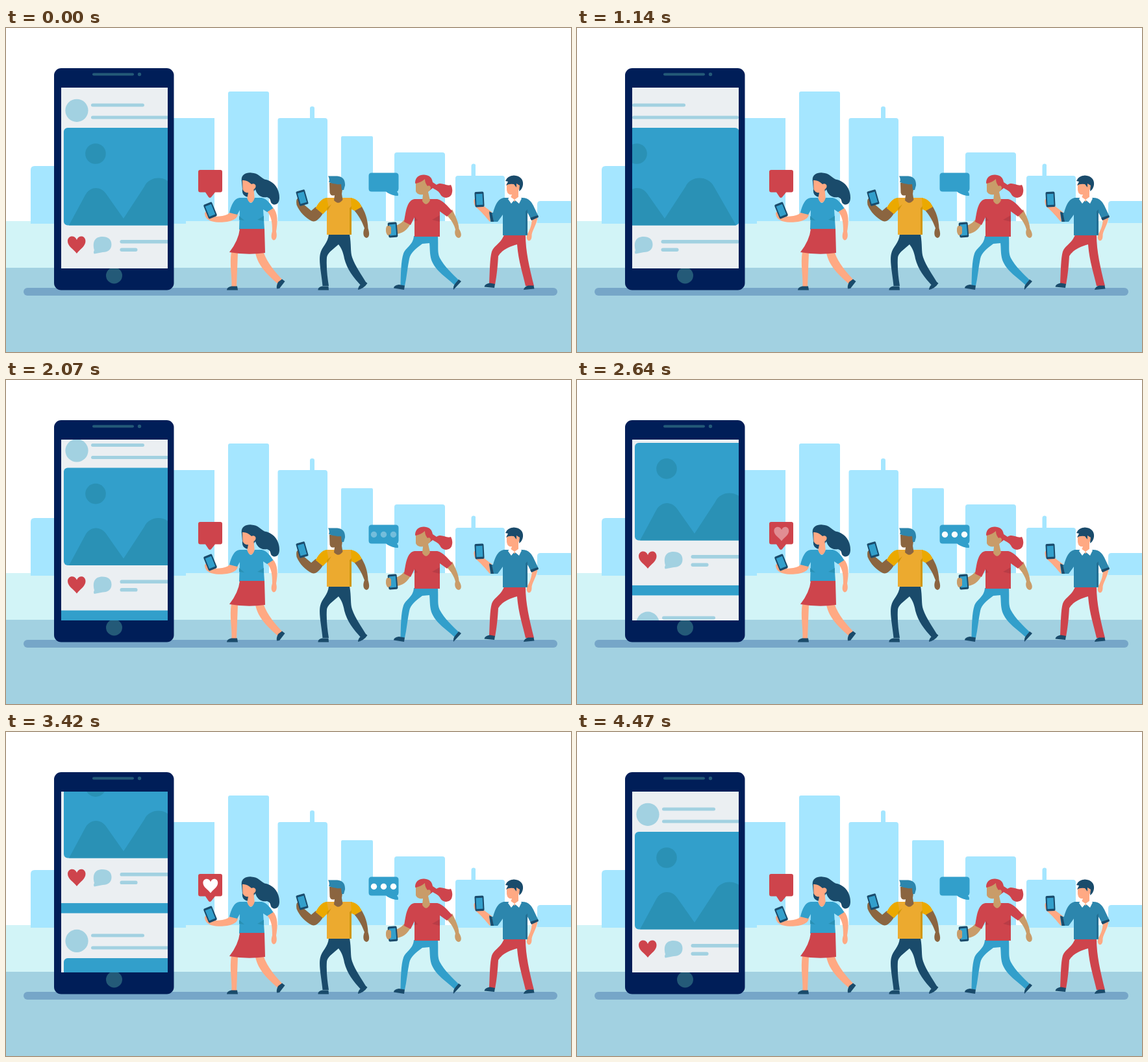
Recreate the animation shown at these times as an HTML page. Size 870 by 500 pixels, loop 4.5 s.

```html
<!DOCTYPE html>
<html lang="en">
<head>
<meta charset="utf-8">
<title>Social feed</title>
<style>
html, body { margin: 0; width: 100%; height: 100%; overflow: hidden; background: #fff; }
svg { display: block; }
.sky { fill: #a5e6ff; } .pale { fill: #a2d1e1; } .blue { fill: #329fcb; } .teal { fill: #2c86ad; }
.navy { fill: #1a4b6b; } .red { fill: #ce444c; } .peach { fill: #ffa983; } .brown { fill: #8b6540; }
.tan { fill: #c99c69; } .gold { fill: #ecaa2f; } .hill { fill: #2a91b5; } .white { fill: #fff; }
</style>
</head>
<body>
<svg width="870" height="500" viewBox="0 0 870 500">
  <defs>
    <path id="heart" d="M109 348C104 341 95 337 95 329C95 320 106 319 109 327C112 319 122.500 320 122.500 329C122.500 337 114 341 109 348Z"/>
    <g id="post">
      <g class="pale">
        <circle cx="109" cy="127.300" r="17.600"/>
        <rect x="131" y="116.500" width="82" height="5" rx="2.500"/>
        <rect x="131" y="135.500" width="164" height="5" rx="2.500"/>
        <path d="M148.500 322C157 322 162.500 326 162.500 334C162.500 342 157 346 149 346L136 348.500Q134 347 136 343C133 331 136 322 148.500 322Z"/>
        <rect x="175.500" y="327" width="120" height="5.500" rx="2.700"/>
        <rect x="175.500" y="339.500" width="27" height="5.500" rx="2.700"/>
      </g>
      <rect class="blue" x="89" y="154" width="206.500" height="150.500" rx="6"/>
      <g class="hill">
        <circle cx="138" cy="194" r="15.800"/>
        <path d="M97 304.500L122 258C130 243 147 244 155 257L181 294L213 245C221 227 248 227 257 245L291 304.500Z"/>
      </g>
      <use href="#heart" class="red"/>
    </g>
    <g id="mobile">
      <rect class="navy" x="-7" y="-11.700" width="14" height="23.400" rx="2"/>
      <rect class="blue" x="-5" y="-8.500" width="10" height="17"/>
    </g>
  </defs>

  <path fill="#d2f4f7" d="M0 298H870V371H0Z"/>
  <g class="sky">
    <path d="M38 302V219Q38 213 44 213H90V302ZM250 139H321V298H277V302H250ZM818 301V272Q818 267 823 267H870V301Z"/>
    <path d="M342 298V101Q342 98 345 98H402Q405 98 405 101V298ZM516 298V169Q516 167 518 167H563Q565 167 565 169V240H585V298Z"/>
    <path d="M418.500 298V142Q418.500 139 422 139H468V124Q468 121 471.500 121T475 124V139H491Q495 139 495 143V298Z"/>
    <path d="M598 298V196Q598 192 602 192H672Q676 192 676 196V298Z"/>
    <path d="M692 302V232Q692 228 696 228H716.500V213Q716.500 209.500 720 209.500T723 213V228H764Q768 228 768 232V302Z"/>
  </g>
  <path class="pale" d="M0 370H870V500H0Z"/>
  <rect x="27" y="401" width="822" height="12" rx="6" fill="#76a6c8"/>

  <rect x="74" y="62" width="184.500" height="342.500" rx="11" fill="#001e58"/>
  <g fill="#245a78">
    <rect x="133" y="69.500" width="64" height="4" rx="2"/>
    <circle cx="205.500" cy="71.500" r="2.700"/>
    <circle cx="166.500" cy="382" r="12.500"/>
  </g>
  <svg x="85" y="92" width="164" height="279" viewBox="85 92 164 279">
    <rect x="85" y="92" width="164" height="279" fill="#ebeff2"/>
    <g id="feed">
      <use href="#post"/>
      <rect class="blue" x="85" y="374" width="230" height="15.500"/>
      <use href="#post" y="305"/>
    </g>
  </svg>

  <path class="red" d="M299 219H330Q333 219 333 222V250Q333 253.500 330 253.500H322L316 261Q314 263 312 261L307 253.500H299Q296 253.500 296 250V222Q296 219 299 219Z"/>
  <use id="like" href="#heart" class="white" transform="translate(315 227)scale(.83)translate(-109 -322)"/>
  <path class="blue" d="M563 223.500H600Q604.500 223.500 604.500 228V248Q604.500 251 602 252.500Q605 256 603.500 259Q594 259 585 252.500H563Q558.500 252.500 558.500 248V228Q558.500 223.500 563 223.500Z"/>
  <g id="dots" class="white">
    <circle cx="566.500" cy="238.500" r="4.700"/><circle cx="581.500" cy="238.500" r="4.700"/><circle cx="596.500" cy="238.500" r="4.700"/>
  </g>

  <g id="woman-in-skirt">
    <path class="navy" d="M363 237C361 227 369 222.500 378 223.500C389 224 391 230 398 233.500C412 236 421 247 421 262C421 270 416 274 411 272C405 269 410 264 402 261C392 263 386 256 384 249L375 261C367 261 363 256 364 249Z"/>
    <path class="peach" d="M364 235Q371 234 378 241Q383 239 384.500 243Q385 247 381.500 249L383 265Q377 274 371 265L373 254Q367 255 364.500 249Z"/>
    <path class="peach" d="M384 347H397C402 362 415 377 426 389L420 396C405 383 388 368 384 347ZM347 345L357 347L355 399H347.500C348 380 344 365 347 345Z"/>
    <path class="navy" d="M340 404.500Q340 400 347 398.500H356L357 404.500ZM417 402.500Q416 398 419 392L425 387.500L429.500 391L421 402Z"/>
    <path class="peach" d="M346 283L357 286C358 297 340 301 323 299.500C312 298 307 294 306 287Q306 283 309 284L315 291C327 291 341 291 346 283ZM402 283L411 277C419 285 418.500 300 416 314C418 322 416 327.500 412 327.500C408 326 408 320 410 314C410 300 409 291 402 283Z"/>
    <use href="#mobile" transform="translate(314.500 281.500)rotate(-22)"/>
    <path class="blue" d="M371 262Q377 278 383 262H394C402 264 407 271 411.500 278L402 284L396 280L398 311H359L360 281L356 288L344 285C347 273 351 263 360 262Z"/>
    <path class="hill" d="M359 290L367 297L359 296ZM397 290V298L387 296Z"/>
    <path class="red" d="M360 310H398L399 347Q372 351 344 346Q358 328 360 310Z"/>
  </g>

  <g id="man-in-cap">
    <path class="brown" d="M477 276L488 286C482 296 476 300 471 298C461 293 452 284 447.500 273Q446 263 450 263L457 271L470 282ZM535 280L546 273C553 283 557 295 557.500 309C560 317 560 323 555 324C550 323 549 316 552 309C548 298 543 289 535 280Z"/>
    <use href="#mobile" transform="translate(456 262)rotate(-16)"/>
    <path class="navy" d="M497 318H529C532 335 530 345 533 354C538 368 547 380 554 392L547 398C535 385 525 372 521 356C519 345 516 339 512 334C503 342 495 347 494 354C493 370 495 385 497 398H487.500C486 380 481 360 484 348C486 338 496 332 497 318ZM480.500 404.500Q480 400 487 398.500H496.500L497 404.500ZM542 404Q542 399 547 395L553 391L556.500 394Q551 402 542 404Z"/>
    <path class="gold" d="M494 262H531C540 264 545 269 547.500 276L537 282L532 280V319H494V280L488 287L477 278C481 270 486 263 494 262Z"/>
    <path fill="#eba900" d="M494 262L497 278L488 287L477 278C481 270 486 263 494 262ZM531 262C540 264 545 269 547.500 276L537 282L532 279Z"/>
    <path fill="#d19608" d="M529 278L532 275V319H529ZM494 278L501 272L495 282Z"/>
    <path class="brown" d="M498 239H516Q520 243 518 249L517 256L518.500 265Q512 274 505 266L506 258Q500 260 498.500 254Z"/>
    <path class="teal" d="M496 228.500H510C519 229 522.500 235 522 243L520 250H517L516 241Q507 242 497 238Q499 233 496 228.500Z"/>
  </g>

  <g id="woman-with-ponytail">
    <path class="blue" d="M628 321H665C666 340 664 346 668 355C675 368 687 379 698 390L692 398C680 386 661 375 655 358C652 348 653 338 652 332L641 333C630 341 623 347 621 356C618 370 617 385 614 398L607.500 397C608 380 608 360 612 348C616 338 627 335 628 321Z"/>
    <path class="navy" d="M597 401.500Q597 397 605 396L614 397.500L613 404ZM689 404Q688 399 692 394L697 388L701 391Z"/>
    <path class="tan" d="M679 289L687 280C692 290 697 300 697.500 310C702 317 702 323 697 324C692 323 690 317 692 311C690 303 686 297 679 289ZM613 296L623 302C618 312 610 317 601 318L588 320C584 316 584 308 588 305C596 307 606 305 613 296Z"/>
    <use href="#mobile" transform="translate(595.500 311.500)rotate(-5)"/>
    <path class="tan" d="M586 306Q592 304 593 308V317Q590 321 587 319Q584 312 586 306Z"/>
    <path class="red" d="M629 264H664C673 266 680 275 687.500 283L679 291L668 283V322H629V292L623 304L613 299C616 280 618 266 629 264Z"/>
    <path fill="#b93c46" d="M668 289V299L656 296ZM629 291L634 297L629 298Z"/>
    <path class="red" d="M630 239C630 230 637 226 644 226.500C653 227 656 232 657 238L663 242C670 236 678 245 685 242Q689 249 686 257C682 264 672 263 669 257C666 251 662 250 657 247L652 251L633 244Z"/>
    <path class="tan" d="M631 240Q640 238 645 233Q645 239 649 244Q653 242 654 246Q654 250 650 253L653 266Q647 277 641 267L642 257Q633 258 631 252Z"/>
  </g>

  <g id="man-in-sweater">
    <path class="peach" d="M754 294L745 299C738 291 732 283 723 276Q719 270 721 264L726 265L736 275L748 284ZM810 292L818.500 293C817 303 811 311 809.500 319C810 326 807 329.500 804 328C801 326 801 320 804 316C808 308 810 301 810 292Z"/>
    <use href="#mobile" transform="translate(729 264.500)rotate(-3)"/>
    <path class="red" d="M767 319H800C800 345 806 370 813 398H800C796 380 789 360 787 334C775 337 763 343 758 352C757 368 756 380 753 396L744 395C745 375 745 355 748 345C752 335 762 333 767 319Z"/>
    <path class="navy" d="M736.500 399.500Q737 395 745 393.500L753 395L752 401ZM797 404Q798 399 804 397.500H812.500L813.500 402.500Z"/>
    <path class="teal" d="M774 262H793C804 261 809 268 812 274L820 291L809 296L803 285V320H765V288L757 299L746 299L744 285L750 285C753 273 758 262 768 262Z"/>
    <path class="navy" d="M744 283L748 285L751 299L747 299ZM807 293L819 289L820 292L809 297Z"/>
    <path fill="#236f94" d="M800 283L803 280V318L800 319Z"/>
    <path class="peach" d="M771 240H788Q793 242 792 246Q791 249 789 250V262L783 268L777 262L779 257Q772 258 771 250Z"/>
    <path class="white" d="M776 260L783 265L790 260L794 263L790 271L783 265L778 271L773 264Z"/>
    <path class="navy" d="M769 236Q772 228 782 227.500C792 228 797 234 796 242Q795 249 790 252L791 243L786 240V246L782 241Q774 240 770 243L773 237Z"/>
  </g>
</svg>
<script>
const LOOP = 4500;
const [feed, like, dots] = ['feed', 'like', 'dots'].map(id => document.getElementById(id));

// Linear interpolation through [time, value] keys.
function track(t, keys) {
  const i = keys.findIndex(([time]) => time > t);
  if (i < 0) return keys[keys.length - 1][1];
  if (i === 0) return keys[0][1];
  const [t0, a] = keys[i - 1], [t1, b] = keys[i];
  return a + (b - a) * (t - t0) / (t1 - t0);
}

const pan = [[0, 0], [920, 61.4], [1800, 0]];
const scroll = [[1800, 0], [3420, 110], [4470, 0]];
const dotsFade = [[1800, 0], [2650, 1], [4090, 1], [4470, 0]];
const likeFade = [[2200, 0], [3300, 1], [4090, 1], [4470, 0]];

function draw(now) {
  const t = now % LOOP;
  feed.setAttribute('transform', `translate(${-track(t, pan)} ${-track(t, scroll)})`);
  dots.setAttribute('opacity', track(t, dotsFade));
  like.setAttribute('opacity', track(t, likeFade));
}

const start = performance.now();
function tick() {
  draw(performance.now() - start);
  requestAnimationFrame(tick);
}
tick();
</script>
</body>
</html>
```
